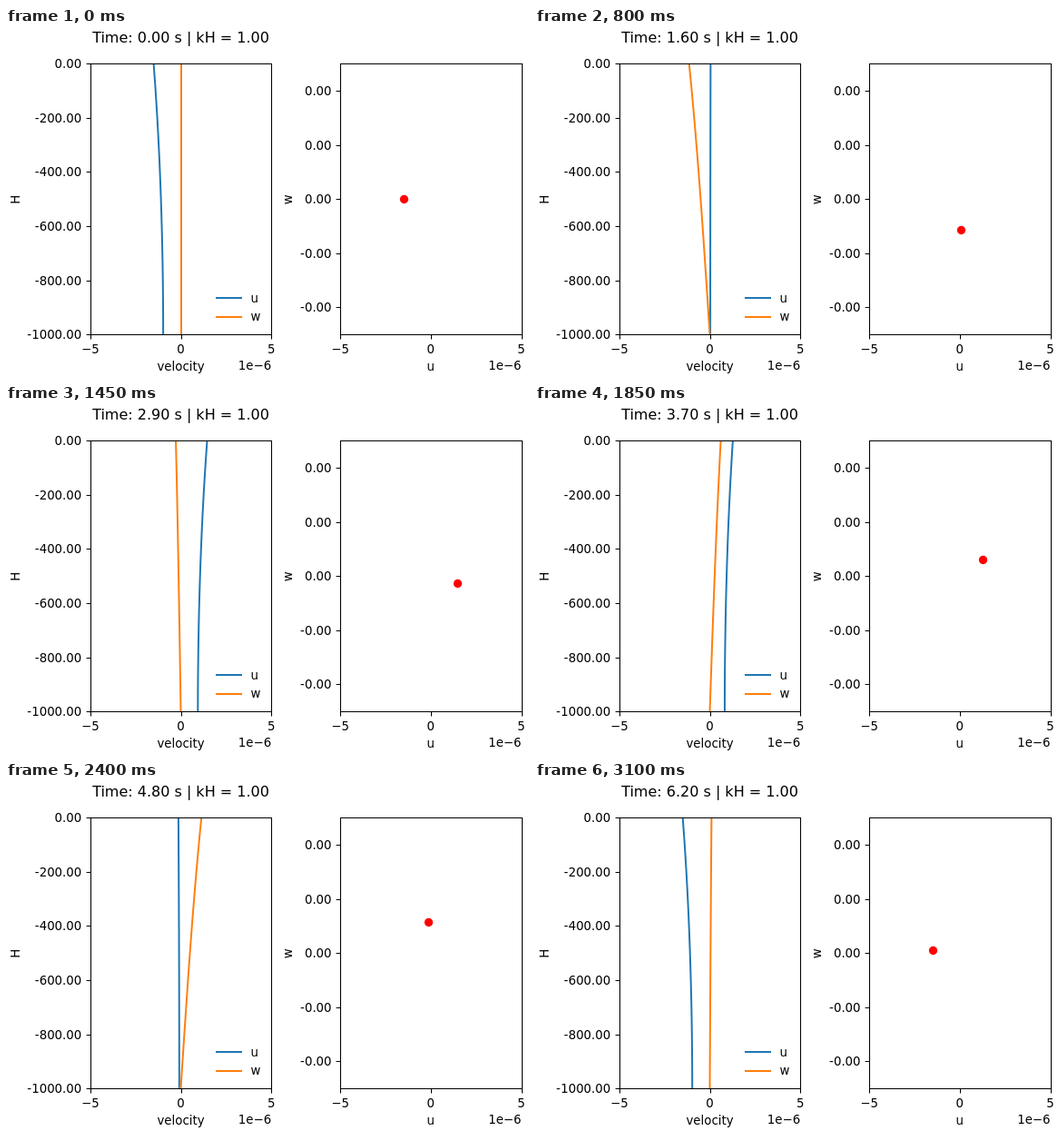
Write an HTML page that moves like this. It is 576 by 384 pixels and loops after 3150 ms.

```html
<!DOCTYPE html>
<html lang="en">
<head>
<meta charset="utf-8">
<title>Wave velocity</title>
<style>
  html, body { margin: 0; width: 100%; height: 100%; overflow: hidden; background: #fff; }
  svg { display: block; font: 13.333px "DejaVu Sans", Verdana, sans-serif; }
  .axis { fill: none; stroke: #000; stroke-width: 1.07; }
  .curve { fill: none; stroke-width: 2; stroke-linecap: square; }
</style>
</head>
<body>
<svg id="stage" width="576" height="384" viewBox="0 0 576 384">
  <clipPath id="inside"><rect x="93" y="39" width="199.5" height="298.2"/></clipPath>
</svg>
<script>
const stage = document.getElementById("stage");
const BLUE = "#1f77b4", ORANGE = "#ff7f0e";
const TOP = 39.2, HEIGHT = 298, MID = TOP + HEIGHT / 2;
const LEFT_X = 192.5, RIGHT_X = 467.8;   // zero velocity in each plot
const UNIT_X = 19.94, UNIT_Y = 29.8;     // pixels per 1e-6
const AMP = 0.972, STEP_MS = 50, STEPS = 63;

function add(tag, attrs, content = "") {
  const el = document.createElementNS("http://www.w3.org/2000/svg", tag);
  for (const name in attrs) el.setAttribute(name, attrs[name]);
  el.textContent = content;
  return stage.appendChild(el);
}

function label(content, x, y, anchor = "middle", extra = {}) {
  return add("text", { x, y, "text-anchor": anchor, ...extra }, content);
}

const snap = v => Math.round(v) + 0.5;

function axes(x0, x1, zero, yTicks, xName, yName, yNameX) {
  const l = snap(x0), r = snap(x1), t = snap(TOP), b = snap(TOP + HEIGHT);
  let d = `M${l} ${t}H${r}V${b}H${l}Z`;
  [[x0, "−5"], [zero, "0"], [x1, "5"]].forEach(([x, name]) => {
    d += `M${snap(x)} ${b}v4.9`;
    label(name, x, 358);
  });
  yTicks.forEach(([y, name]) => {
    d += `M${l} ${snap(y)}h-4.9`;
    label(name, x0 - 9.5, Math.round(y + 4.9), "end");
  });
  add("path", { d, class: "axis" });
  label(xName, zero, 377);
  label("1e−6", x1, 376, "end");
  label(yName, 0, 0, "middle", { transform: `translate(${yNameX} ${MID + 0.5}) rotate(-90)` });
}

const curve = stroke => add("path", { class: "curve", stroke, "clip-path": "url(#inside)" });
const uCurve = curve(BLUE), wCurve = curve(ORANGE);
const dot = add("circle", { r: 4.67, fill: "#f00" });

const depths = [0, 1, 2, 3, 4, 5].map(i => [TOP + i * HEIGHT / 5, (i ? "-" : "") + (i * 200).toFixed(2)]);
const heights = [2, 1, 0, -1, -2].map(i => [MID - i * 2 * UNIT_Y, (i < 0 ? "-" : "") + "0.00"]);
axes(92.8, 292.2, LEFT_X, depths, "velocity", "H", 15);
axes(368.1, 567.5, RIGHT_X, heights, "u", "w", 315);

[["u", BLUE, 297, 302], ["w", ORANGE, 318, 322]].forEach(([name, stroke, y, base]) => {
  add("path", { d: `M232 ${y}H259`, class: "curve", stroke });
  label(name, 269.5, base, "start");
});
const title = label("", 192.5, 16, "middle", { "font-size": 16 });

// s runs from 0 at the bed to 1 at the surface (kH = 1)
const u = (s, t) => -AMP * Math.cosh(s) * Math.cos(t);
const w = (s, t) => -AMP * Math.sinh(s) * Math.sin(t);

function profile(speed, t) {
  const points = [];
  for (let i = 0; i <= 40; i++) {
    const s = i / 40;
    points.push((LEFT_X + UNIT_X * speed(s, t)).toFixed(2) + " " + (TOP + HEIGHT * (1 - s)).toFixed(2));
  }
  return "M" + points.join("L");
}

let start;
function draw(now) {
  start ??= now;
  const t = Math.floor((now - start) / STEP_MS) % STEPS / 10;
  title.textContent = `Time: ${t.toFixed(2)} s | kH = 1.00`;
  uCurve.setAttribute("d", profile(u, t));
  // a perfectly upright line sits on whole pixels
  wCurve.setAttribute("d", t ? profile(w, t) : `M193 ${TOP}V${TOP + HEIGHT}`);
  dot.setAttribute("cx", snap(RIGHT_X + UNIT_X * u(1, t)));
  dot.setAttribute("cy", snap(MID - UNIT_Y * w(1, t)));
  requestAnimationFrame(draw);
}
draw(performance.now());
</script>
</body>
</html>
```
